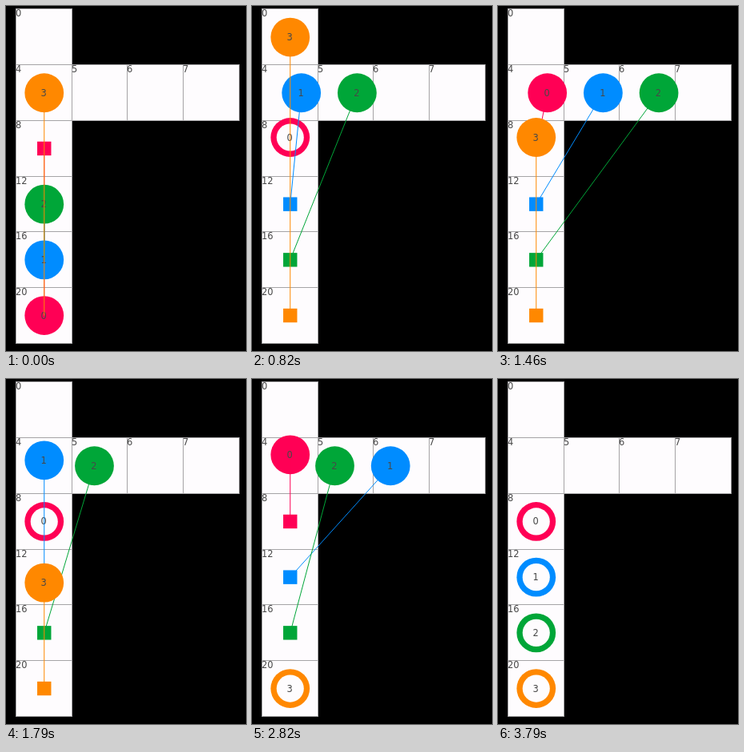
These frames come from a looping animation (300 by 432 pixels, 3.82 s). An HTML page:

```html
<!DOCTYPE html>
<html lang="en">
<head>
<meta charset="utf-8">
<title>Agents on a grid</title>
<style>
  html, body { margin: 0; width: 100%; height: 100%; overflow: hidden; background: #000; }
  svg { display: block; width: 300px; height: 432px; }
  text { font-family: "DejaVu Sans", sans-serif; font-size: 11.4px; fill: #484848; }
</style>
</head>
<body>
<svg id="stage" viewBox="0 0 300 432"></svg>
<script>
const LOOP = 3820, STEP_MS = 251, STEPS = 15;
const SIZE = 69.7, LEFT = 12.5, TOP = 3.9, COLS = 4, ROWS = 6, SIDE_ROW = 1;
const WHITE = '#fefcfe', GAP = '#a5a4a6';
const svg = document.getElementById('stage');

// Cell ids (row * COLS + column) to visit in turn; a repeated id waits one step.
const agents = [
  { color: '#ff0055', stops: [20, 5, 8, 8, 12, 0, 0, 8] },
  { color: '#008cff', stops: [16, 6, 0, 6, 12] },
  { color: '#00a638', stops: [12, 7, 8, 5, 16] },
  { color: '#ff8800', stops: [4, 0, 0, 0, 0, 20] }
];

function add(tag, attrs, text) {
  const el = document.createElementNS('http://www.w3.org/2000/svg', tag);
  set(el, attrs);
  if (text !== undefined) el.textContent = text;
  return svg.appendChild(el);
}
function set(el, attrs) {
  for (const k in attrs) el.setAttribute(k, attrs[k]);
}

const col = id => id % COLS;
const row = id => Math.floor(id / COLS);
const edgeX = c => Math.floor(LEFT + SIZE * c) + 0.5;
const edgeY = r => Math.floor(TOP + SIZE * r) + 0.5;
const center = id => ({
  x: LEFT + SIZE * (col(id) + 0.5) + 0.4,
  y: TOP + SIZE * (row(id) + 0.5) + 0.3
});

// The cells form a T, so there is only one way from cell to cell.
function nextCell(id, goal) {
  if (row(id) === row(goal)) return id + Math.sign(goal - id);
  if (col(id) > 0) return id - 1;
  return id + COLS * Math.sign(row(goal) - row(id));
}

function route(stops) {
  const path = [stops[0]];
  for (const stop of stops.slice(1)) {
    do path.push(nextCell(path.at(-1), stop));
    while (path.at(-1) !== stop);
  }
  return path;
}

function drawGrid() {
  const cells = [];
  for (let id = 0; id < ROWS * COLS; id++) {
    if (col(id) === 0 || row(id) === SIDE_ROW) cells.push(id);
  }
  for (const id of cells) {
    const x = edgeX(col(id)), y = edgeY(row(id));
    add('rect', {
      x, y, width: edgeX(col(id) + 1) - x, height: edgeY(row(id) + 1) - y,
      fill: WHITE, stroke: GAP
    });
  }
  for (const id of cells) {
    add('text', { x: edgeX(col(id)) - 0.4, y: edgeY(row(id)) + 9.3 }, id);
  }
}

function drawAgents() {
  for (const a of agents) {
    a.path = route(a.stops);
    a.goal = a.path.at(-1);
    const g = center(a.goal), s = SIZE / 4;
    add('rect', { x: g.x - s / 2, y: g.y - s / 2, width: s, height: s, fill: a.color });
  }
  agents.forEach((a, i) => {
    const g = center(a.goal);
    a.disc = add('circle', { r: SIZE * 0.35, fill: a.color });
    a.line = add('line', { x1: g.x, y1: g.y, stroke: a.color });
    a.hole = add('circle', { r: SIZE * 0.245, fill: WHITE });
    a.label = add('text', { 'text-anchor': 'middle' }, i);
  });
}

function render(ms) {
  // Playback advances in tenths of a step.
  const step = Math.min(STEPS, Math.floor(ms / STEP_MS * 10) / 10);
  const n = Math.floor(step), f = step - n;
  for (const a of agents) {
    const from = a.path[n] ?? a.goal, to = a.path[n + 1] ?? a.goal;
    const p = center(from), q = center(to);
    const x = p.x + (q.x - p.x) * f, y = p.y + (q.y - p.y) * f;
    set(a.disc, { cx: x, cy: y });
    set(a.line, { x2: x, y2: y });
    set(a.hole, { cx: x, cy: y, visibility: from === a.goal ? 'visible' : 'hidden' });
    set(a.label, { x: x - 0.6, y: y + 4 });
  }
}

drawGrid();
drawAgents();
render(0);
const start = performance.now();
function tick() {
  render((performance.now() - start) % LOOP);
  requestAnimationFrame(tick);
}
requestAnimationFrame(tick);
</script>
</body>
</html>
```
